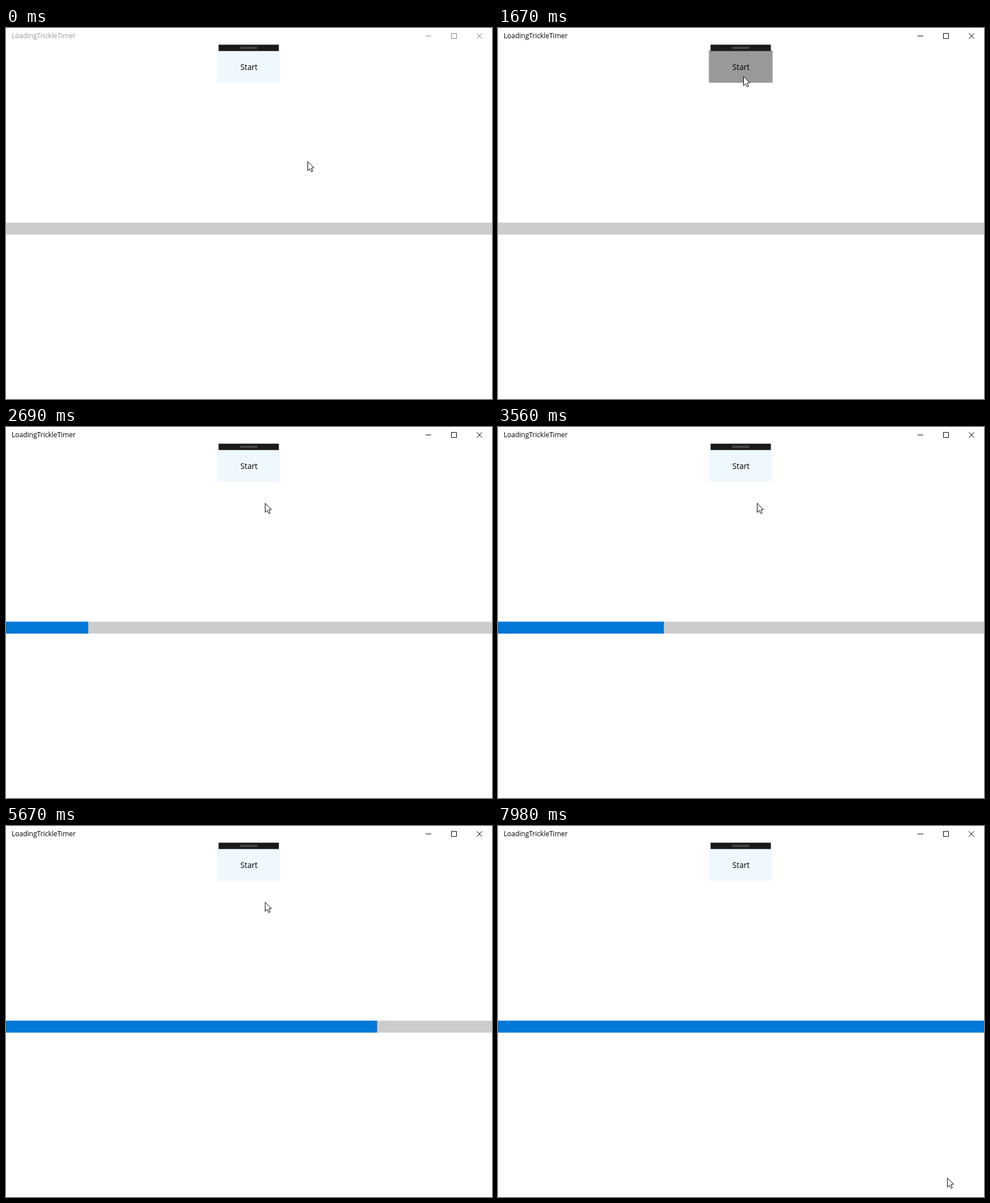
Write an HTML page with a canvas that moves like this. It is 856x654 px and loops after 9160 ms.

```html
<!DOCTYPE html>
<html lang="en">
<head>
<meta charset="utf-8">
<title>Progress bar</title>
<style>
  html, body { margin: 0; width: 100%; height: 100%; overflow: hidden; background: #fff; }
  canvas { display: block; }
</style>
</head>
<body>
<canvas id="stage" width="856" height="654"></canvas>
<script>
const ctx = document.getElementById('stage').getContext('2d');
const WIDTH = 856, HEIGHT = 654;
const LOOP = 9160;
const STEP = 77.9;      // time between screen updates
const PRESS = 1670;     // button goes down, window becomes active
const RELEASE = 1840;   // button comes up, bar starts to fill
const FILL = 4980;      // time for the bar to fill
const FONT = '"Open Sans", "Noto Sans", sans-serif';

const HOME = { x: 531, y: 235 };
const MOVES = [
  { from: 740, to: 1200, x: 433, y: 109 },
  { from: 1200, to: 1430, x: 432, y: 85 },
  { from: 2310, to: 2700, x: 456, y: 134 },
  { from: 7290, to: 7970, x: 791, y: 620 }
];

const clamp = v => Math.min(1, Math.max(0, v));
const smooth = k => k * k * (3 - 2 * k);
const lastUpdate = t => PRESS + Math.floor((t - PRESS) / STEP) * STEP;

function pointerAt(t) {
  let { x, y } = HOME;
  for (const m of MOVES) {
    const k = smooth(clamp((t - m.from) / (m.to - m.from)));
    x += (m.x - x) * k;
    y += (m.y - y) * k;
  }
  return [Math.round(x), Math.round(y)];
}

function rect(color, x, y, w, h) {
  ctx.fillStyle = color;
  ctx.fillRect(x, y, w, h);
}

function text(str, x, y, size, color, align) {
  ctx.font = size + 'px ' + FONT;
  ctx.textAlign = align;
  ctx.fillStyle = color;
  ctx.fillText(str, x, y);
}

function drawTitleBar(active) {
  text('LoadingTrickleTimer', 10, 18, 12, active ? '#000' : '#999', 'left');
  ctx.strokeStyle = active ? '#000' : '#808080';
  ctx.lineWidth = 1;
  ctx.beginPath();
  ctx.moveTo(739, 14);
  ctx.lineTo(749, 14);
  ctx.rect(784.5, 9.5, 9, 9);
  ctx.moveTo(829.3, 9.3);
  ctx.lineTo(838.7, 18.7);
  ctx.moveTo(838.7, 9.3);
  ctx.lineTo(829.3, 18.7);
  ctx.stroke();
}

function drawButton(hover, pressed) {
  rect(pressed ? '#999' : hover ? '#ccc' : '#f0f8ff', 371.4, 39.5, 112.2, 57);
  if (hover && !pressed) {
    ctx.strokeStyle = '#848484';
    ctx.lineWidth = 2;
    ctx.strokeRect(372.4, 40.5, 110.2, 55);
  }
  text('Start', 428, 74, 13.7, '#000', 'center');
  rect('#1a1a1a', 374.4, 29.4, 106.2, 11.2);
  rect('#444', 412.5, 33, 30, 4);
}

function drawPointer(x, y) {
  const shape = [[0, 0], [0, 16], [3.6, 12.5], [6.3, 18], [8.7, 17.2], [6.4, 11.5], [11, 11]];
  ctx.beginPath();
  for (const [dx, dy] of shape) ctx.lineTo(x + dx + 0.5, y + dy + 0.5);
  ctx.closePath();
  ctx.fillStyle = '#fff';
  ctx.fill();
  ctx.strokeStyle = '#000';
  ctx.lineWidth = 1;
  ctx.lineJoin = 'round';
  ctx.stroke();
  ctx.lineJoin = 'miter';
}

function draw(now) {
  const t = lastUpdate(now % LOOP);
  const [x, y] = pointerAt(t);
  const hover = x > 371 && x < 484 && y < 97;
  const pressed = t >= PRESS && t < RELEASE;

  rect('#fff', 0, 0, WIDTH, HEIGHT);
  drawTitleBar(t >= PRESS);
  drawButton(hover, pressed);
  rect('#ccc', 0, 343.2, WIDTH, 21);
  rect('#0078d7', 0, 343.2, WIDTH * clamp((t - RELEASE) / FILL), 21);
  drawPointer(x, y);
}

const began = performance.now();
function tick() {
  draw(performance.now() - began);
  requestAnimationFrame(tick);
}
tick();
</script>
</body>
</html>
```
